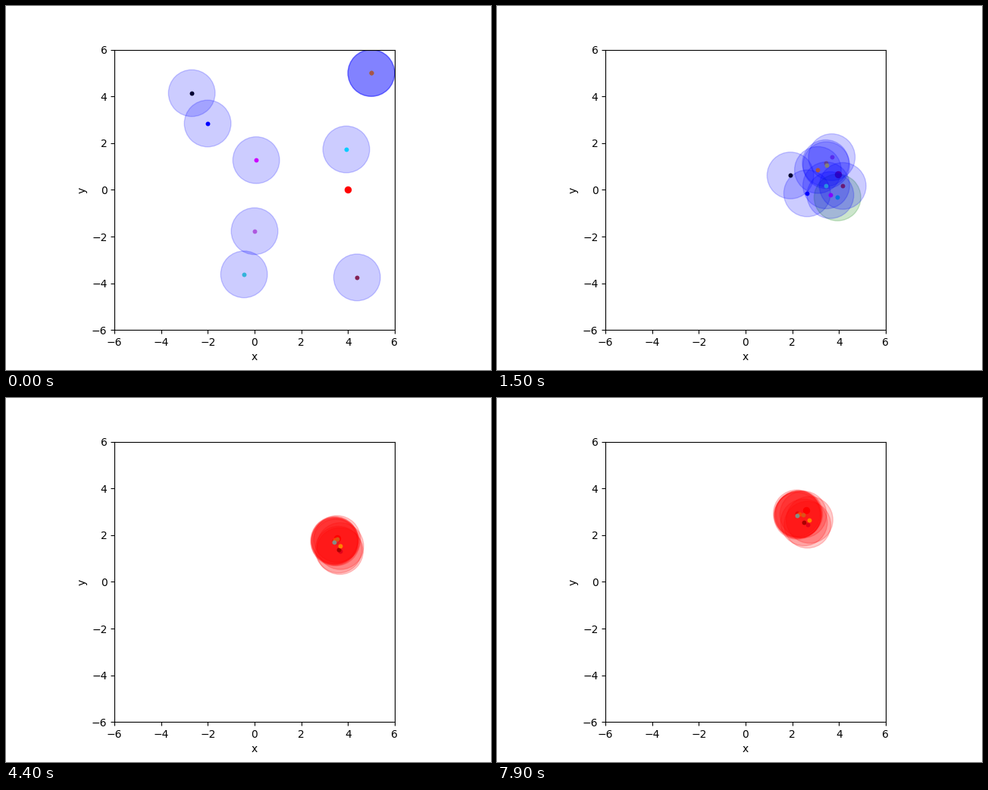
A matplotlib script that plays this animation: 640 px wide and 480 px high, repeating every 8 s.

```python
import matplotlib.pyplot as plt
import numpy as np
from matplotlib.animation import FuncAnimation
from matplotlib.patches import Circle

FRAMES = 80
OMEGA = 0.011              # angle the leader turns per frame
BURST = 9                  # frames of the first bang-bang phase
ACCEL = 2 * 2.19 / BURST**2
KEYS = np.array([BURST, 23, 36, 52, 79])

CORNER = ((5, 5), (-1.59, -2.19))

# colour, (start, first move), offsets from the leader at the later keys,
# times at which the ring turns green and red
AGENTS = [
    ("blue", ((-2.01, 2.84), (2.19, -2.18)),
     [(.09, -.14), (.09, -.45), (.13, -.59), (.07, -.61)], 17, 22),
    ("cyan", ((3.93, 1.73), (.03, -1.95)),
     [(0, -.08), (.03, -.20), (-.13, -.13), (-.33, -.18)], 15, 30),
    ("magenta", ((.07, 1.27), (2.15, -1.62)),
     [(-.06, -.18), (-.06, -.10), (-.12, -.12), (-.32, -.16)], 16, 39),
    ("orchid", ((0, -1.77), (2.18, 2.17)),
     [(-.08, -.02), (-.08, -.08), (-.14, -.15), (-.34, -.20)], 17, 40),
    ("brown", ((4.39, -3.75), (-.42, 2.17)),
     [(-.11, -.08), (-.12, -.07), (-.18, -.14), (-.39, -.12)], 18, 41),
    ("black", ((-2.69, 4.14), (2.18, -2.18)),
     [(-.33, -.18), (.04, -.43), (.02, -.50), (-.08, -.51)], 18, 21),
    ("orange", CORNER,
     [(.12, .12), (-.09, .03), (-.11, -.14), (-.28, -.15)], 19, 31),
    ("yellow", CORNER,
     [(.22, -.11), (.12, -.28), (.16, -.36), (.16, -.40)], 18, 20),
    ("turquoise", ((-.45, -3.62), (2.18, 2.17)),
     [(-.01, -.21), (-.09, -.17), (-.15, -.17), (-.37, -.23)], 19, 42),
    ("chocolate", CORNER,
     [(-.53, -.47), (-.06, -.05), (-.02, -.07), (-.11, -.17)], 27, 44),
]


def leader_at(n):
    return 4 * np.array([np.cos(OMEGA * n), np.sin(OMEGA * n)])


def leader_speed(n):
    return 4 * OMEGA * np.array([-np.sin(OMEGA * n), np.cos(OMEGA * n)])


def burst(move, n):
    """Speed up from rest, then brake, covering `move` in BURST frames."""
    move = np.array(move, float)
    brake = np.sqrt(np.maximum(BURST**2 - 2 * np.abs(move) / ACCEL, 0) / 2)
    late = np.maximum(n - (BURST - brake), 0)
    push = np.sign(move) * ACCEL
    shift = push * (n**2 / 2 - late**2)
    speed = push * (n - 2 * late)
    tiny = np.abs(move) < 0.1
    return (np.where(tiny, move * n / BURST, shift),
            np.where(tiny, 0, speed))


def make_path(start, move, offsets):
    start = np.array(start, float)
    shift, speed = burst(move, BURST)
    rel = np.vstack([start + shift - leader_at(BURST), offsets])
    slope = np.diff(rel, axis=0) / np.diff(KEYS)[:, None]
    mid = (rel[3:] - rel[1:-2]) / (KEYS[3:] - KEYS[1:-2])[:, None]
    vel = np.vstack([speed - leader_speed(BURST), slope[1], mid, slope[-1]])

    def path(n):
        if n <= BURST:
            return start + burst(move, n)[0]
        i = min(np.searchsorted(KEYS, n) - 1, len(KEYS) - 2)
        span = KEYS[i + 1] - KEYS[i]
        s = (n - KEYS[i]) / span
        ease = s * s * (3 - 2 * s)
        return (leader_at(n) + rel[i] * (1 - ease) + rel[i + 1] * ease
                + span * s * (1 - s) * (vel[i] * (1 - s) - vel[i + 1] * s))

    return path


fig, ax = plt.subplots(figsize=(6.4, 4.8), dpi=100)
ax.set_aspect("equal")
ax.set(xlim=(-6, 6), ylim=(-6, 6), xlabel="x", ylabel="y")
ax.set_xticks(range(-6, 7, 2))
ax.set_yticks(range(-6, 7, 2))


def add_dot(color, size):
    return ax.scatter([0], [0], s=size, color=color, linewidths=0, zorder=1)


leader = add_dot("red", 46)
swarm = []
for color, (start, move), offsets, green, red in AGENTS:
    dot = add_dot(color, 18)
    ring = ax.add_patch(Circle((0, 0), 1, alpha=0.2, zorder=1))
    swarm.append((dot, ring, make_path(start, move, offsets), green, red))


def update(n):
    leader.set_offsets([leader_at(n)])
    for dot, ring, path, green, red in swarm:
        pos = path(n)
        dot.set_offsets([pos])
        ring.center = tuple(pos)
        ring.set_color("r" if n >= red else "g" if n >= green else "b")
    return []


anim = FuncAnimation(fig, update, frames=FRAMES, interval=100,
                     repeat=True, repeat_delay=0, blit=False)
plt.show()
```
